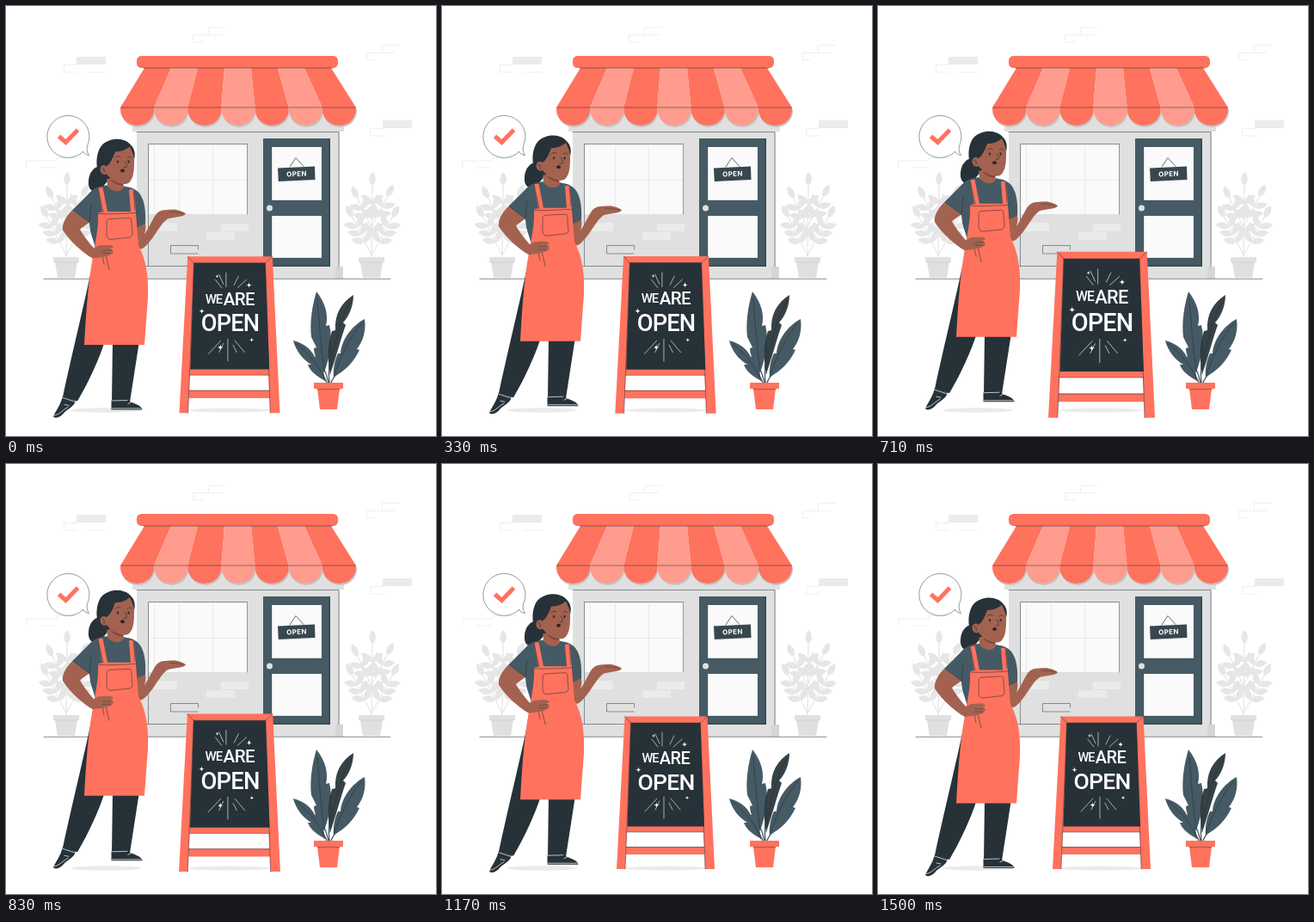
An HTML page for the animation above (1540 ms loop, 500 px wide and 500 px high).

```html
<!DOCTYPE html>
<html lang="en">
<head>
<meta charset="utf-8">
<title>We are open</title>
<style>
html, body { margin: 0; width: 100%; height: 100%; overflow: hidden; background: #fff; }
svg { display: block; width: 100%; height: 100%; }
.line { fill: none; stroke: #263238; stroke-width: .7; stroke-linecap: round; stroke-linejoin: round; }
.faint { fill: none; stroke: #ebebeb; stroke-width: .8; }
.chalk { fill: none; stroke: #e0e0e0; stroke-width: .7; stroke-linecap: round; }
.coral { fill: #ff725e; }
.dark { fill: #263238; }
.slate { fill: #455a64; }
.grey { fill: #e0e0e0; }
.pale { fill: #ebebeb; }
.paper { fill: #fafafa; }
.skin { fill: #a3624f; }
text { text-anchor: middle; fill: #fff; }
#board text { font-family: Roboto, sans-serif; font-weight: 500; }
</style>
</head>
<body>
<svg viewBox="0 0 500 500">
  <g id="bricks">
    <path class="pale" d="M82 59h34v9H82zM438 133h34v9h-34z"/>
    <path class="faint" d="M82 68.500H67.500V77H82M95 77H116M252 33.500H217.500V42H230M235.500 33V25H256M452 54.500H419.500V63H428M437.500 54V45.500H458M438 142.500H423.500V151H440M23.500 188V180H60M40 188H58M59 179V176.500H88"/>
  </g>
  <g id="bush">
    <path d="M55 292h30v6H55zM57 298h26l-3 18H60z" fill="#e0e0e0"/>
    <path d="M57 298H83" stroke="#ccc" stroke-width=".7"/>
  </g>
  <use href="#bush" x="355"/>

  <g id="shop">
    <path class="grey" d="M152 118H388V304H152zM147 139H393V146H147zM148 303H392V317H148z"/>
    <path d="M383 303h9v14h-9z" fill="#d6d6d6"/>
    <path class="paper" d="M166 161H281V242H166z"/>
    <path d="M172.500 162V242M201.500 162V242M240.500 162V242M167 202.500H280" stroke="#e6e6e6" stroke-width=".8"/>
    <path class="pale" d="M250 253h32v9h-32zM233 263h33v9h-33zM167 252h32v10h-32z"/>
    <path class="line" d="M152 146.500H387V303M165.500 302V160.500H280.500V242M152.500 302.500H299M223 288H191.500V278.500H223.500V283" stroke-opacity=".7"/>
    <path class="slate" d="M299 154h78v149h-78z"/>
    <path d="M375.500 154h1.500v149h-78v-1.500h76.500z" fill="#37474f"/>
    <path class="paper" d="M309 164h58v62h-58zM309 244h58v49h-58z"/>
    <path class="line" d="M309 164V226H367M309 244V293H367" stroke-opacity=".4"/>
    <circle class="grey" cx="306.500" cy="235" r="3.500"/>
    <path class="line" d="M330 187L337 176.500L346 186.500"/>
    <path d="M316 188.500L359 186.500L359.500 202L316.800 204z" fill="#37474f"/>
    <text x="338" y="198" transform="rotate(-2 338 195)" font-family="Inter, sans-serif" font-weight="700" font-size="8" letter-spacing=".3">OPEN</text>
    <g id="awning"></g>
    <rect class="coral" x="152" y="58" width="234" height="14" rx="5.500"/>
    <path class="line" d="M160 72H380" stroke-opacity=".75"/>
    <path class="line" d="M134 118H406" stroke-opacity=".75"/>
  </g>
  <path class="line" d="M44 317.300H447" stroke-opacity=".8"/>

  <g id="bubble">
    <path class="line" style="fill:#fff" stroke-opacity=".7" d="M89.500 169.500A24.500 24.500 0 1 1 94.500 162.500C93.500 167 94.500 171 96.500 173.500C93.500 173.500 91 171.500 89.500 169.500z"/>
    <path d="M61.500 151.500L69.500 158.500L83.500 144" fill="none" stroke="#ff725e" stroke-width="5"/>
  </g>

  <g id="potted">
    <path class="line" d="M368 418Q373 428 375 438M379 400Q374 420 376 438M385 428Q380 432 378 438M360 420Q369 427 373 438" style="stroke:#455a64;stroke-width:1.300"/>
    <path class="slate" d="M370 426C362 415 358 405 358 398L361 397L355 385C353 368 356 348 361 332C372 346 375 360 372 372L376 371C380 386 377 408 370 426zM381 431C380 420 383 410 386 404L389 404C390 388 402 372 417 364C419 378 415 390 408 399L411 400C405 413 394 425 381 431zM371 436C363 431 354 426 351 417L355 417C345 411 337 401 334 389C346 392 355 399 359 408L362 407C367 416 370 426 371 436z"/>
    <path class="dark" d="M377 428C373 408 375 390 379 378L383 377C382 358 390 345 404 336C404 350 398 362 392 368L395 371C389 388 384 408 377 428z" fill-opacity=".92"/>
    <path class="line" d="M362 340C364 372 367 400 370 426M402 340C386 370 380 400 377 428M414 368C398 388 388 410 381 431M338 393C354 406 366 420 371 436" style="stroke-width:.6"/>
    <path class="coral" d="M358 438h34v7h-34zM362 445h26l-3 24h-20z"/>
    <path class="line" d="M362 445.500H388" stroke-opacity=".6"/>
  </g>

  <ellipse class="pale" cx="116" cy="470" rx="41" ry="2.800"/>
  <ellipse class="pale" cx="260" cy="470" rx="48" ry="2.500"/>

  <g id="keeper">
    <path class="dark" d="M101 298C94 335 79 395 66 455L83 460C96 438 108 412 115 390H124L123 461H144L155 390L130 300z"/>
    <path class="dark" d="M66 454L81 459.500C79 467 71 469 67 474C63 479 58 480.500 55 478C57 472 63 466 66 454zM122.500 459L140 457.500C146 463 158 464 158.500 470H122.500z"/>
    <path class="line" d="M66 456L81 461M56 476.500C62 476 66 470 72 467M123 459.500L141 459M123 468.500H157M142 463L146 461M68 464L73 465" style="stroke:#fff"/>
    <path class="dark" d="M111 187C101 186 95 197 96 208C97 216 103 218 110 214L119 203z"/>
    <path class="slate" d="M117 209C106 210 100 214 96 219L77 238L97 253L98 262C100 270 103 276 104 284L153 284L153 259L162 254C163 238 161 220 150 214C146 211 141 211 137 210z"/>
    <path class="line" d="M97 252L99 232M152 258L151 240" stroke-opacity=".8"/>
    <path class="skin" d="M116 188L118 210C123 217 133 218 137 212L136 203z"/>
    <path d="M122 203C127 208 132 209 136 209L136 205z" fill="#7e4438"/>
    <path class="skin" d="M152.500 258L162 253.500C163 258 162 262 161 266C167 257 171 247 175 242C181 236 188 238 196 237C201 238 208 240 209 242.500C205 246.500 195 245.500 188 248C179 253 170 276 158 283C152 284 151 274 152.500 258z"/>
    <path class="line" d="M190 240C196 240 202 241 206 242" stroke-opacity=".6"/>
    <path class="coral" d="M107 212L112.500 211.500L118 239.500H145L143 214L148.500 213.500L151 240L154 279C163 295 166 316 165 340L161 394.500H91C93 360 95 325 101 292C104 274 108 258 107 241L112 240z"/>
    <path class="line" d="M107 242C120 243 136 242 151 241M117 252C116 249 120 248 123 248L143 247C146 247 146 250 146 254L147 266C147 269 144 270 140 270L122 272C119 272 117 270 117 266zM112 291L114 301M116 290L120 307M107 212L113 240M148 214L150 238" stroke-opacity=".8"/>
    <path class="skin" d="M77 238C69 246 65 254 66 261C75 275 90 288 101 294C108 293 118 292 123 289C126 286 125 284 121 283L125 281C123 277 114 279 108 279L102 282C96 275 89 266 86 260L97 252z"/>
    <path class="line" d="M113 285L123 284M112 288L121 288M78 238L97 252" stroke-opacity=".6"/>
    <path class="dark" d="M112 203C104 194 103 173 111 163C119 154 135 153 143 160C149 165 151 171 149 179L124 200z"/>
    <path class="skin" d="M116 187C121 185 124 178 127 170C134 170 140 167 144 164C147 170 150 177 149 183C149 193 148 201 143 206C138 209 131 207 126 204C122 202 119 198 117 196C112 198 108 193 110 188C112 185 115 185 116 187z"/>
    <path class="line" d="M138 181C140 184 141 186 140 188L137 188M127 177C129 175 131 175 133 176M141 177C143 175 145 176 146 177M112 189C114 189 115 191 114 194"/>
    <path class="dark" d="M130 180a1.200 1.700 0 1 0 .1 0zM142.500 180a1.200 1.700 0 1 0 .1 0z"/>
    <ellipse cx="135.500" cy="192" rx="2.500" ry="2" fill="#3a2022"/>
  </g>

  <g id="board">
    <path class="coral" d="M212.500 293.500H308.500L317 471H306L304 428H215L213 471H203zM214 445H306V454H214z"/>
    <path class="dark" d="M219.500 301H300.500L305 421.500H215.500z"/>
    <path class="line" d="M212.500 293.500L219.500 301L213 471M308.500 293.500L300.500 301L306 471M219 301H300.500M215 428H305M214 445.500H305" stroke-opacity=".65"/>
    <text x="242" y="346.500" font-size="14.500" letter-spacing="-1">WE</text>
    <text x="270.500" y="348.500" font-size="20" letter-spacing="-.600">ARE</text>
    <text x="260.500" y="378.500" font-size="26.500" letter-spacing="-.800">OPEN</text>
    <path class="chalk" d="M256 312V328M244 320L251 329M248 314L253 325M265 326L270 316M269 329L279 320M258 387V412M250 389L236 404M266 389L277 402M253 392L248 402M264 394L268 402"/>
    <path id="stars" fill="#fff"/>
  </g>
</svg>
<script>
const $ = id => document.getElementById(id);
const add = (parent, d, fill, transform = '') =>
  parent.insertAdjacentHTML('beforeend', `<path d="${d}" fill="${fill}" transform="${transform}"/>`);

// Awning: seven stripes, each ending in a scallop with a soft shadow
const scallop = x => `M${x} 118h39.140v2a19.570 19 0 0 1 -39.140 0z`;
const lowerEdge = i => 133 + i * 39.14, upperEdge = i => 161 + i * 31;
for (let i = 0; i < 7; i++) add($('awning'), scallop(lowerEdge(i)), '#c4c4c4', 'translate(1 2)');
for (let i = 0; i < 7; i++) {
  const fill = i % 2 ? '#ff9c8e' : '#ff725e';
  add($('awning'), `M${upperEdge(i)} 72H${upperEdge(i + 1)}L${lowerEdge(i + 1)} 118H${lowerEdge(i)}z`, fill);
  add($('awning'), scallop(lowerEdge(i)), fill);
}

// Bush: branches with paired leaves and a leaf at the tip
function branch(x0, y0, x1, y1, pairs) {
  const angle = Math.atan2(y1 - y0, x1 - x0) * 180 / Math.PI + 90;
  const leaf = (x, y, turn) => add($('bush'), 'M0 0C5 -4 5 -11 0 -16C-5 -11 -5 -4 0 0', '#e6e6e6',
    `translate(${x} ${y}) rotate(${angle + turn})`);
  $('bush').insertAdjacentHTML('afterbegin', `<path d="M${x0} ${y0}L${x1} ${y1}" stroke="#e0e0e0"/>`);
  for (let i = 0; i < pairs; i++) {
    const k = .35 + .6 * i / pairs, x = x0 + (x1 - x0) * k, y = y0 + (y1 - y0) * k;
    leaf(x, y, -52);
    leaf(x, y, 52);
  }
  leaf(x1, y1, 0);
}
branch(70, 292, 71, 209, 3);
branch(70, 290, 48, 246, 3);
branch(70, 290, 94, 246, 3);
branch(70, 258, 54, 224, 2);
branch(71, 255, 88, 222, 2);

const star = ([x, y, r]) => `M${x} ${y - r}Q${x} ${y} ${x + r} ${y}Q${x} ${y} ${x} ${y + r}Q${x} ${y} ${x - r} ${y}Q${x} ${y} ${x} ${y - r}`;
$('stars').setAttribute('d',
  [[282, 326, 3.5], [228.5, 355.5, 3.5], [249.5, 396.5, 3.5], [285, 388, 2.5], [246, 316, 2]].map(star).join(''));

const LOOP = 1540, LEAD = 40;
const beat = [[0, 1], [.1, 1.1], [.3, 1], [.4, 1], [.5, 1.1], [.6, 1], [1, 1]];

function heartbeat(p) {
  const i = beat.findIndex(([at]) => at > p);
  const [a, from] = beat[i - 1], [b, to] = beat[i];
  return from + (to - from) * (p - a) / (b - a);
}

function draw(now) {
  const p = (now + LEAD) % LOOP / LOOP;
  const lift = 10 * (1 - Math.abs(1 - 2 * p));
  $('keeper').setAttribute('transform', `translate(0 ${-lift})`);
  $('board').setAttribute('transform', `translate(260 382) scale(${heartbeat(p)}) translate(-260 -382)`);
}

function tick() {
  draw(performance.now());
  requestAnimationFrame(tick);
}
tick();
</script>
</body>
</html>
```
